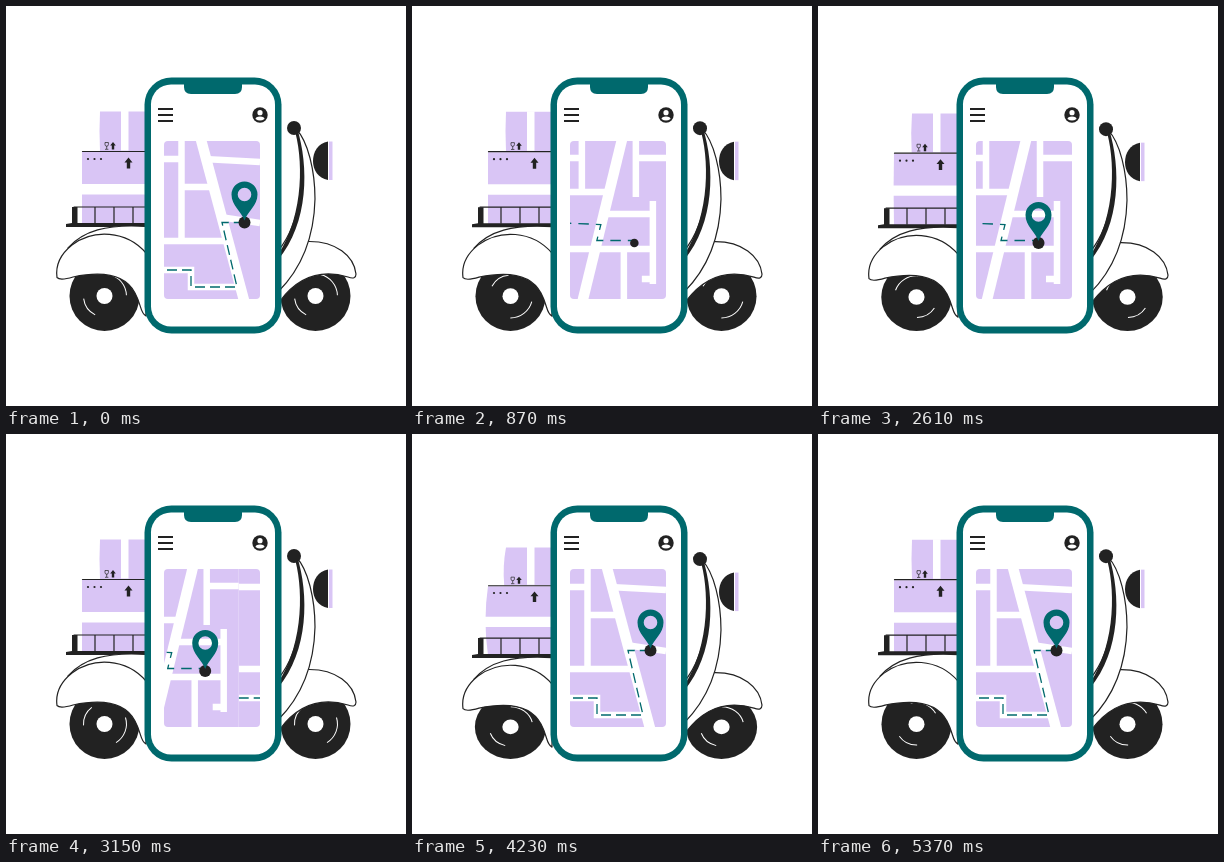
Write an HTML page that moves like this. It is 400 by 400 pixels and loops after 5.4 s.

```html
<!DOCTYPE html>
<html lang="en">
<head>
<meta charset="utf-8">
<title>Scooter delivery</title>
<style>
  html, body { margin: 0; width: 100%; height: 100%; overflow: hidden; background: #fff; }
  svg { display: block; width: 100vw; height: 100vh; }
  .teal { fill: #00696d; }
  .lilac { fill: #d9c5f5; }
  .dark { fill: #222; }
  .white { fill: #fff; }
  .line { stroke: #222; stroke-width: 1.2; stroke-linecap: round; stroke-linejoin: round; }
  .none { fill: none; }
  .road { fill: none; stroke: #fff; stroke-width: 6.5; }
  .wide { stroke-width: 10.5; }
  .route { fill: none; stroke: #00696d; stroke-width: 1.3; stroke-dasharray: 10 5; }
  #mapB .route { stroke-dasharray: 10.5 7; stroke-dashoffset: 3; }
</style>
</head>
<body>
<svg viewBox="0 0 400 400">
  <defs>
    <clipPath id="screen"><rect x="158" y="135" width="96" height="158" rx="4"/></clipPath>
    <g id="wheel">
      <circle r="35" class="dark"/>
      <g class="spin none" stroke="#fff" stroke-width="1">
        <path d="M4.5 -21.5A22 22 0 0 1 21.9 -1"/>
        <path d="M-9 19A21 21 0 0 1 -20.8 3"/>
      </g>
      <circle r="8" class="white"/>
    </g>
    <path id="pin" class="teal" fill-rule="evenodd" d="M0 -2C-3 -11 -13 -17 -13 -28A13 13 0 0 1 13 -28C13 -17 3 -11 0 -2ZM-6.800 -28A6.800 6.800 0 0 0 6.800 -28A6.800 6.800 0 0 0 -6.800 -28Z"/>
  </defs>

  <g id="rear"><use href="#wheel"/></g>
  <g id="front"><use href="#wheel"/></g>

  <g id="body">
    <g id="boxes">
      <path id="topBox" class="lilac"/>
      <path id="bigBox" class="lilac"/>
      <path class="white" d="M115 105h7.5v39.500h-7.500zM72 178h68v10.500H72z"/>
      <path class="line none" d="M76.500 145.500H140"/>
      <g class="dark">
        <circle cx="82" cy="153" r="1.100"/><circle cx="88.500" cy="153" r="1.100"/><circle cx="95" cy="153" r="1.100"/>
        <path d="M122.500 151.500l4 5h-2.300v6h-3.400v-6h-2.300zM107 136l2.800 3.500h-1.600v4h-2.400v-4h-1.600z"/>
      </g>
      <path class="none" stroke="#222" stroke-width=".7" d="M99 136.500h3.400v2a1.700 1.700 0 0 1-3.400 0zM100.700 140v3M99 143.300h3.400"/>
    </g>
    <path class="line none" d="M68 201H140M89 201V217M108 201V217M127 201V217"/>
    <path class="dark" d="M66 201h5.500v16H140v4H60v-3l6-1z"/>

    <path class="line white" d="M62 242C77 225 100 218 140 220.500V260H80Z"/>
    <path class="line white" d="M51 271.500C49 257 56 247 66 239C87 223 120 224 140 247V310C134 307 136 300 129 287C118 266 91 266 67 271Q54 275 51 271.500Z"/>

    <path class="line white" d="M302 235.500C330 235 348 250 350 268Q350 274 342 271C315 263 292 271 274 295V245Z"/>
    <path class="line white" d="M290 123C302 135 309 165 309 193C308 235 293 265 272 286V245C295 217 302 165 290 123Z"/>
    <path class="dark" d="M288 122C297 150 299 207 272 249V254C303 217 303 160 291 122Z"/>
    <circle cx="288" cy="122" r="7" class="dark"/>
    <path class="dark" d="M322 135.500C312 137 307 146 307 155S312 172 322 174Z"/>
    <path class="lilac" d="M323 135.500h3.500v38.500h-3.500z"/>
  </g>

  <rect x="138.500" y="71.500" width="137" height="256" rx="27" class="teal"/>
  <rect x="145" y="78.500" width="124" height="242" rx="20" class="white"/>
  <path class="teal" d="M178 78H236V81Q236 88 229 88H185Q178 88 178 81Z"/>
  <path class="none" stroke="#222" stroke-width="2" d="M152 103h15M152 109h15M152 115h15"/>
  <circle cx="254" cy="109" r="7.700" class="dark"/>
  <circle cx="254" cy="106.700" r="2.600" class="white"/>
  <path class="white" d="M249.500 113Q249.500 110.500 254 110.500T258.500 113Q254 116 249.500 113Z"/>

  <g clip-path="url(#screen)">
    <g id="mapA">
      <rect x="146" y="135" width="108" height="158" class="lilac"/>
      <path class="road" d="M146 153H175M175.500 130V235M178 181H206M146 235H224M198 153L254 156M214 211L254 217"/>
      <path class="road wide" d="M194 130L239 298"/>
      <path class="road" d="M146 264H185V281H231"/>
    </g>
    <g id="mapB">
      <rect x="150" y="135" width="104" height="158" class="lilac"/>
      <path class="road" d="M150 152H166M168 130V185M150 186H196M222 130V191M222 152H254M186 208H239M239 195V278M150 243H239M228 273H242M210 243V298"/>
      <path class="road wide" d="M209 130L168 298"/>
    </g>
  </g>
</svg>
<script>
const LOOP = 5400, HALF = LOOP / 2, SLIDE = 108, BOB = 450, TURN = HALF / 7;
const NS = 'http://www.w3.org/2000/svg';
const $ = id => document.getElementById(id);
const spin = document.querySelector('.spin');
const clamp = x => Math.max(0, Math.min(1, x));
const inOut = u => u < .5 ? 4 * u ** 3 : 1 - 4 * (1 - u) ** 3;
const outBack = u => 1 + 2.2 * (u - 1) ** 3 + 1.2 * (u - 1) ** 2;

function add(parent, tag, attrs) {
  const el = document.createElementNS(NS, tag);
  for (const key in attrs) el.setAttribute(key, attrs[key]);
  return parent.appendChild(el);
}

function makeMap(id, points, dot, slideTime, drawTime) {
  const group = $(id);
  const lengths = points.slice(1).map((p, i) => Math.hypot(p[0] - points[i][0], p[1] - points[i][1]));
  return {
    group, points, lengths, dot, slideTime, drawTime,
    total: lengths.reduce((a, b) => a + b),
    route: add(group, 'path', { class: 'route' }),
    end: add(group, 'circle', { cx: dot[0], cy: dot[1], class: 'dark' }),
    pin: add(group, 'use', { href: '#pin' })
  };
}

const mapA = makeMap('mapA', [[146, 264], [185, 264], [185, 281], [231, 281], [216, 216.5], [238, 216.5]], [238.5, 216.5], 1230, 960);
const mapB = makeMap('mapB', [[150, 217], [187, 218.5], [183, 234.5], [220, 234.5]], [220.5, 237], 1040, 840);

function routeTo(map, share) {
  let left = map.total * share, d = 'M' + map.points[0];
  map.lengths.forEach((len, i) => {
    if (left <= 0) return;
    const u = Math.min(1, left / len), [a, b] = [map.points[i], map.points[i + 1]];
    d += `L${a[0] + (b[0] - a[0]) * u} ${a[1] + (b[1] - a[1]) * u}`;
    left -= len;
  });
  return d;
}

function showMap(map, x, time) {
  map.group.setAttribute('transform', `translate(${x} 0)`);
  map.group.style.display = Math.abs(x) < SLIDE ? '' : 'none';
  const drawn = clamp((time - 300) / (map.drawTime - 300));
  map.route.setAttribute('d', routeTo(map, drawn));
  map.end.setAttribute('r', 6 * clamp((time - map.drawTime + 40) / 100));
  const size = outBack(clamp((time - map.drawTime - 60) / 260));
  map.pin.setAttribute('transform', `translate(${map.dot}) scale(${Math.max(0, size)})`);
  map.pin.style.display = time > map.drawTime + 60 ? '' : 'none';
}

function placeWheel(id, x, press) {
  $(id).setAttribute('transform', `translate(${x} ${290 + 3.2 * press}) scale(${1 + .02 * press} ${1 - 3.2 * press / 35})`);
}

function render(t) {
  const press = (1 - Math.cos(2 * Math.PI * t / BOB)) / 2;
  $('body').setAttribute('transform', `translate(0 ${3.4 * press})`);
  // The load gives way later than the springs do.
  const squash = press ** 1.8;
  $('boxes').setAttribute('transform', `translate(0 ${218 * .052 * squash}) scale(1 ${1 - .052 * squash})`);
  const bulge = 3 * squash;
  $('topBox').setAttribute('d', `M94 105.5H140V145H${94 - bulge * .7}Q${93 - bulge} 125 94 105.5Z`);
  $('bigBox').setAttribute('d', `M76 146H140V218H76Q${76 - 2 * bulge} 182 76 146Z`);
  placeWheel('rear', 98.5, press);
  placeWheel('front', 309.5, press);
  spin.setAttribute('transform', `rotate(${360 * t / TURN})`);

  const time = t % HALF;
  const [fresh, old] = t < HALF ? [mapB, mapA] : [mapA, mapB];
  const shift = SLIDE * inOut(clamp(time / fresh.slideTime));
  showMap(old, -shift, time + HALF);
  showMap(fresh, SLIDE - shift, time);
}

const start = performance.now();
function tick() {
  render((performance.now() - start) % LOOP);
  requestAnimationFrame(tick);
}
render(0);
requestAnimationFrame(tick);
</script>
</body>
</html>
```
